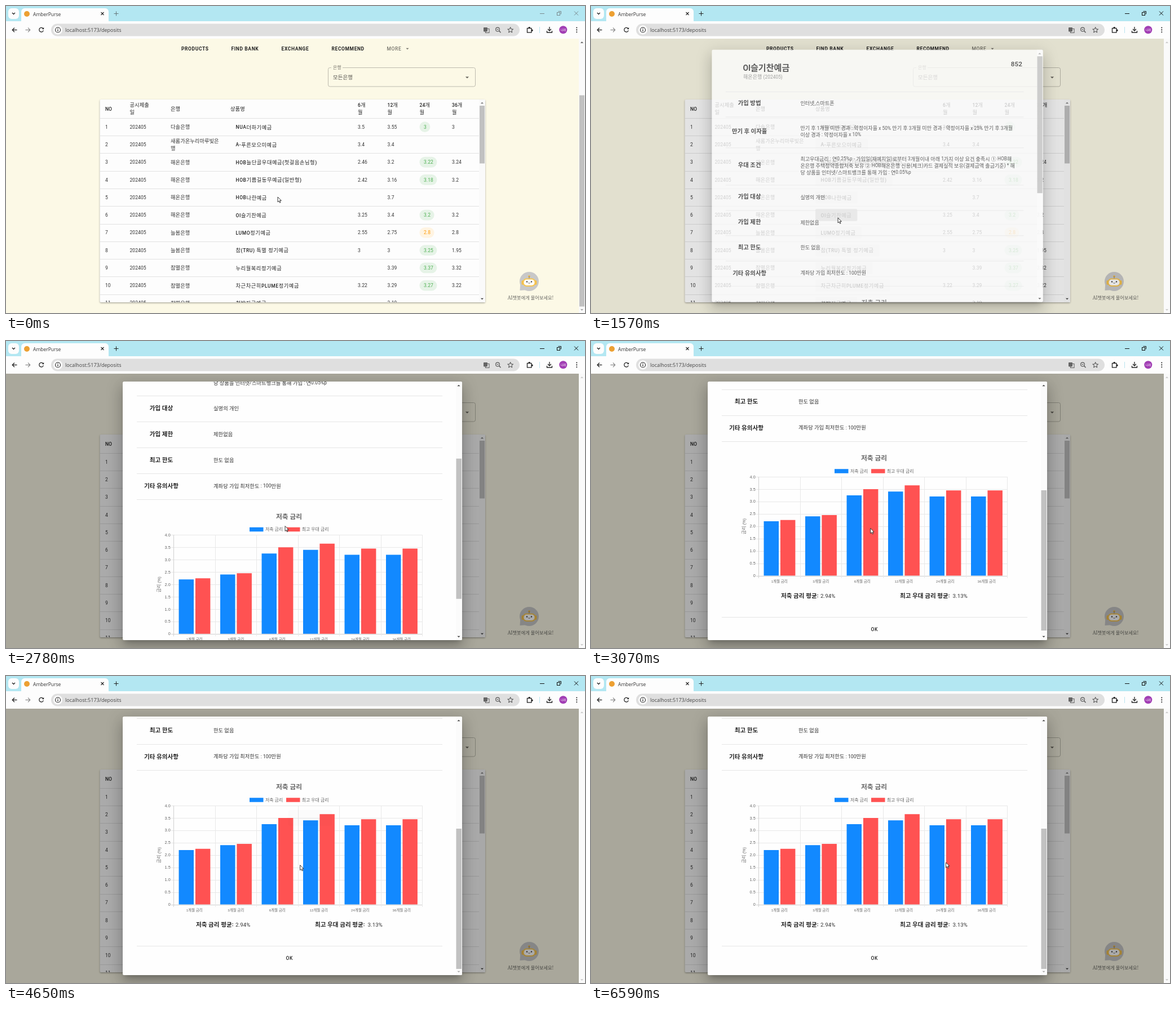
Animation, 1027 px wide and 545 px high, one loop 6700 ms. Source, as an HTML page with a canvas:

```html
<!DOCTYPE html>
<html lang="ko">
<head>
<meta charset="utf-8">
<title>Deposits</title>
<style>
html, body { margin: 0; width: 100%; height: 100%; overflow: hidden; background: #fcf9e6; }
canvas { display: block; width: 1027px; height: 545px; }
</style>
</head>
<body>
<canvas id="stage" width="1027" height="545"></canvas>
<script>
const g = document.getElementById('stage').getContext('2d');
const LOOP = 6700, KR = '"Noto Sans CJK KR", "Noto Sans CJK", sans-serif';
const BLUE = '#1289ff', RED = '#ff5252';

// Bursts of movement: start, end, number of steps
const bursts = [[400, 870, 6], [1370, 1980, 7], [2080, 2180, 2], [2380, 2970, 7], [3070, 3170, 2],
  [3470, 3670, 3], [4360, 4950, 7], [5050, 5720, 8], [5820, 6490, 8], [6590, 6590, 1]];

const cursorKeys = [[310, 482, 339], [870, 438, 376], [1880, 438, 376], [1980, 446, 365], [2080, 473, 345],
  [2180, 495, 328.5], [2970, 495, 328.5], [3070, 495.7, 332.5], [3670, 495.7, 334], [4260, 495.7, 334],
  [4950, 541, 337], [5430, 536.3, 333.5], [5720, 538, 337], [6490, 629.5, 331]];
const scrollKeys = [[2280, 0], [2380, 33], [2970, 328], [3070, 333], [3170, 335], [3370, 335], [3670, 344]];
// Tooltip: time, tip x, tip y, opacity, extra width
const tipKeys = [[3370, 496.5, 252, 0, 0], [3670, 496.5, 252, 1, 0], [4260, 496.5, 252, 1, 0], [4660, 496.5, 252, 0, 0],
  [4850, 581, 252, 0, 16], [5430, 553.5, 255, 0.5, 6], [5720, 540.5, 256.4, 1, 0], [5820, 540.5, 256.4, 1, 0],
  [6010, 566, 247, 1, 0], [6110, 570, 245.5, 0.8, 0], [6300, 606, 261, 0.9, 0], [6400, 614, 265, 0.8, 0],
  [6490, 614, 265, 0.35, 0], [6590, 614, 265, 0, 0]];
const tipItems = [[0, 2, 1], [4700, 3, 0], [5900, 3, 1], [6180, 4, 0]];

const rows = [
  ['다솔은행', 'NUA더하기예금', 3.5, 3.55, 3, 3],
  ['새롬가온누리마루빛은행', 'A-푸른모으미예금', 3.4, 3.4, '', ''],
  ['해온은행', 'HOB늘단골우대예금(첫걸음손님형)', 2.46, 3.2, 3.22, 3.24],
  ['해온은행', 'HOB기쁨길동무예금(일반형)', 2.42, 3.16, 3.18, 3.2],
  ['해온은행', 'HOB나란예금', '', 3.7, '', ''],
  ['해온은행', 'OI슬기찬예금', 3.25, 3.4, 3.2, 3.2],
  ['늘봄은행', 'LUMO정기예금', 2.55, 2.75, 2.8, 2.8],
  ['늘봄은행', '참(TRU) 특별 정기예금', 3, 3, 3.25, 1.95],
  ['참별은행', '누리월복리정기예금', '', 3.39, 3.37, 3.32],
  ['참별은행', '차근차근히PLUME정기예금', 3.22, 3.29, 3.27, 3.22],
  ['참별은행', '첫발자국예금', '', 3.19, '', '']
];
const rateX = [624, 676.5, 741, 791];

// Label, label centre, text lines with the centre of the first, rule below
const details = [
  ['가입 방법', 178, 178.5, ['인터넷,스마트폰'], 203],
  ['만기 후 이자율', 229, 223.5, ['만기 후 1개월 미만 경과 : 약정이자율 x 50% 만기 후 3개월 미만 경과 : 약정이자율 x 25% 만기 후 3개월',
    '이상 경과 : 약정이자율 x 10%'], 259],
  ['우대 조건', 291, 279.7, ['최고우대금리 : 연0.25%p - 가입일(재예치일)로부터 3개월이내 아래 1가지 이상 요건 충족시 ① HOB해',
    '온은행 주택청약종합저축 보유 ② HOB해온은행 신용(체크)카드 결제실적 보유(결제금액 출금기준) * 해',
    '당 상품을 인터넷/스마트뱅크를 통해 가입 : 연0.05%p'], 327.5],
  ['가입 대상', 348.5, 349.5, ['실명의 개인'], 373.5],
  ['가입 제한', 394.5, 395.5, ['제한없음'], 419.5],
  ['최고 한도', 440.5, 441, ['한도 없음'], 465.5],
  ['기타 유의사항', 487, 487, ['계좌당 가입 최저한도 : 100만원'], 511.5]
];
const months = [1, 3, 6, 12, 24, 36];
const series = [['저축 금리', BLUE, '#047df4', [2.2, 2.4, 3.25, 3.4, 3.2, 3.2]],
  ['최고 우대 금리', RED, '#ff3030', [2.25, 2.45, 3.5, 3.65, 3.45, 3.45]]];

function quantize(t) {
  const b = bursts.filter(b => b[0] <= t).pop();
  if (!b) return 0;
  const step = (b[1] - b[0]) / Math.max(1, b[2] - 1) || 1;
  return b[0] + Math.min(b[2] - 1, Math.floor((t - b[0]) / step + 0.1)) * step;
}
function at(keys, t) {
  const n = keys.findIndex(k => k[0] > t);
  if (n === 0) return keys[0].slice(1);
  if (n < 0) return keys[keys.length - 1].slice(1);
  const a = keys[n - 1], b = keys[n], p = (t - a[0]) / (b[0] - a[0]);
  return a.slice(1).map((v, i) => v + (b[i + 1] - v) * p);
}
const ramp = (t, a, b) => Math.max(0, Math.min(1, (t - a) / (b - a)));

// Hangul and Latin runs get their own font; y is the visual centre
function runs(s, size, o) {
  const { w = 400, f = 'Roboto', k = 1.087, ls = size * 0.01 } = o;
  return s.match(/[가-힣①②]+|[^가-힣①②]+/g).map(part => {
    const ko = /[가-힣①②]/.test(part);
    const font = ko ? `${w} ${size * k}px ${KR}` : `${w} ${size}px "${f}", ${KR}`;
    g.font = font;
    g.letterSpacing = ls + 'px';
    return { part, font, ko, ls, width: g.measureText(part).width };
  });
}
const widthOf = (s, size, o = {}) => runs(s, size, o).reduce((n, r) => n + r.width, 0);
function text(s, x, y, size, o = {}) {
  s = String(s);
  if (!s) return;
  const list = runs(s, size, o);
  x -= list.reduce((n, r) => n + r.width, 0) * (o.al || 0);
  g.fillStyle = o.c || '#333';
  for (const r of list) {
    g.font = r.font;
    g.letterSpacing = r.ls + 'px';
    g.fillText(r.part, x, y + size * (r.ko ? 0.4 : 0.355));
    x += r.width;
  }
}
function box(x, y, w, h, c, r = 0) {
  g.fillStyle = c;
  g.beginPath();
  g.roundRect(x, y, w, h, r);
  g.fill();
}
function disc(x, y, r, c) {
  g.fillStyle = c;
  g.beginPath();
  g.arc(x, y, r, 0, 7);
  g.fill();
}
function ring(x, y, r, c, w = 1, a = 0, b = Math.PI * 2) {
  g.strokeStyle = c;
  g.lineWidth = w;
  g.beginPath();
  g.arc(x, y, r, a, b);
  g.stroke();
}
function path(p, c, w = 1, fill = false) {
  g.beginPath();
  for (let i = 0; i < p.length; i += 2) g.lineTo(p[i], p[i + 1]);
  if (fill) { g.closePath(); g.fillStyle = c; g.fill(); }
  else { g.strokeStyle = c; g.lineWidth = w; g.stroke(); }
}
const rule = (x1, x2, y, c) => box(x1, Math.round(y), x2 - x1, 1, c);
const arrow = (x, y, s, c, d = 1) => path([x - s, y - d * s / 2, x + s, y - d * s / 2, x, y + d * s / 2], c, 1, true);

function chrome(active) {
  const ink = '#222', cap = active ? '#111' : '#7a8a8e';
  box(0, 0, 1027, 28, '#b3e7f2');
  box(4, 4, 19, 19, '#fdfdfd', 6);
  path([11, 12, 13.5, 14.5, 16, 12], ink, 1.3);
  box(27, 4, 155, 30, '#fdfdfd', 6);
  disc(37, 14, 5, '#eda032');
  text('AmberPurse', 48, 14.5, 8.5, { f: 'Open Sans', ls: 0 });
  path([168.5, 11, 173.5, 16], ink, 1.1);
  path([173.5, 11, 168.5, 16], ink, 1.1);
  path([191.5, 13.5, 199.5, 13.5], active ? ink : '#66777b');
  path([195.5, 9.5, 195.5, 17.5], active ? ink : '#66777b');
  path([947, 13.5, 955, 13.5], cap);
  g.strokeStyle = cap;
  g.strokeRect(977.5, 11.5, 5, 5);
  path([979.5, 9.5, 984.5, 9.5, 984.5, 14.5], cap);
  path([1008, 9.5, 1015, 16.5], cap);
  path([1015, 9.5, 1008, 16.5], cap);

  box(0, 27, 1027, 31, '#fdfdfd');
  path([19.5, 42.5, 11.5, 42.5], ink, 1.3);
  path([15, 38.7, 11.3, 42.5, 15, 46.3], ink, 1.3);
  path([34.5, 42.5, 42.5, 42.5], '#888', 1.2);
  path([39, 38.7, 42.7, 42.5, 39, 46.3], '#888', 1.2);
  ring(62.7, 42.3, 3.8, ink, 1.3, 0.3, 5.6);
  path([64, 41.2, 67.2, 41.2, 67.2, 38], ink, 1.3, true);
  box(80, 31.5, 831, 22, '#dfdfdf', 11);
  disc(92, 42.5, 8, '#fdfdfd');
  ring(92, 42.5, 4.5, ink, 1.1);
  box(91.4, 41.7, 1.2, 3.3, ink);
  box(91.4, 39.8, 1.2, 1.2, ink);
  text('localhost:5173/deposits', 105, 42.8, 9, { f: 'Open Sans', ls: 0, c: '#444' });
  box(847, 38, 7, 7.5, '#666', 1);
  g.strokeStyle = '#666';
  g.strokeRect(850.5, 40.5, 6.5, 7);
  ring(872, 41.5, 3.4, '#555', 1.1);
  path([874.5, 44, 877.5, 47.2], '#555', 1.4);
  path([870.3, 41.5, 873.7, 41.5], '#555');
  const star = [];
  for (let i = 0; i <= 10; i++) {
    const a = i * Math.PI / 5 - Math.PI / 2, r = i % 2 ? 2.3 : 5.2;
    star.push(894.7 + r * Math.cos(a), 42.8 + r * Math.sin(a));
  }
  path(star, '#444');
  g.strokeStyle = ink;
  g.lineWidth = 1.3;
  g.strokeRect(924.5, 39.5, 7.5, 7.5);
  box(926.5, 37, 3.4, 3, ink, 1.5);
  box(932, 41.5, 2.6, 3.4, ink, 1.5);
  box(946, 37, 1, 11, '#b9e3ee');
  path([964, 37, 964, 43.5], ink, 1.3);
  path([961, 41, 964, 44, 967, 41], ink, 1.3);
  path([959.5, 44, 959.5, 47, 968.5, 47, 968.5, 44], ink, 1.3);
  disc(988.3, 42.3, 7, '#a13db4');
  text('나래', 988.3, 42.3, 4.6, { al: 0.5, c: '#fff', ls: 0 });
  for (const y of [38.5, 42.4, 46.3]) disc(1012.3, y, 1.05, ink);
}

function robot() {
  const grey = '#c8c8c8';
  disc(928, 489, 17, grey);
  path([912.5, 490, 911.5, 505, 926, 504], grey, 1, true);
  disc(928, 480, 1.8, '#f2b632');
  box(927.4, 480, 1.2, 5, '#888');
  box(914.5, 487, 4, 8, '#f4c04a', 2);
  box(937.5, 487, 4, 8, '#f4c04a', 2);
  box(917, 483.5, 22, 14.5, '#f6c552', 6);
  box(918.5, 485.5, 19, 10.5, '#fff', 5);
  disc(924, 489.5, 1.2, '#444');
  disc(932, 489.5, 1.2, '#444');
  ring(928, 490.5, 1.8, '#555', 0.8, 0.3, 2.8);
  text('AI챗봇에게 물어보세요!', 930.5, 518, 8.2, { al: 0.5, f: 'Noto Serif', k: 1, ls: 0, c: '#6b6b66' });
}

function page(t, cx, cy) {
  const opened = t >= 1370;
  box(0, 58, 1016, 487, '#fcf9e6');
  const nav = { w: 600, ls: 0.6, c: '#222' };
  [['PRODUCTS', 311], ['FIND BANK', 399.5], ['EXCHANGE', 488.5], ['RECOMMEND', 577.5]]
    .forEach(([s, x]) => text(s, x, 76, 8.5, nav));
  text('MORE', 675.5, 76, 8.5, { w: 500, ls: 0.6, c: '#77756c' });
  arrow(712, 76, 2.6, '#77756c');

  g.strokeStyle = '#bdbbae';
  g.lineWidth = 1;
  g.beginPath();
  g.roundRect(571.5, 109.5, 261, 33.5, 3);
  g.stroke();
  box(577, 108, 20, 3, '#fcf9e6');
  text('은행', 580, 109, 7.3, { c: '#77756c' });
  text('모든은행', 580, 127, 8.7, { c: '#55534d' });
  arrow(818, 127, 3.1, '#66645c');

  g.save();
  g.shadowColor = 'rgba(0,0,0,.35)';
  g.shadowBlur = 3;
  g.shadowOffsetY = 1.3;
  box(166.5, 166, 683.5, 360, '#fdfdfd', 2);
  g.restore();
  g.save();
  g.beginPath();
  g.rect(166, 166, 684, 360);
  g.clip();
  const head = { w: 500, c: '#222' };
  text('NO', 176, 182.5, 8.5, head);
  [['은행', 292], ['상품명', 398]].forEach(([s, x]) => text(s, x, 182.3, 8.5, head));
  [['공시제출', '일', 219.5], ['6개', '월', 624], ['12개', '월', 676.5], ['24개', '월', 733.5], ['36개', '월', 791]]
    .forEach(([a, b, x]) => { text(a, x, 176, 8.5, head); text(b, x, 188.6, 8.5, head); });
  rule(166, 839, 198.6, '#e2e2e2');
  rows.forEach((r, i) => {
    const y = 214.7 + i * 31.27;
    text(i + 1, 176, y, 8.5);
    text('202405', 219.5, y, 8.5);
    if (r[0].length > 10) {
      text(r[0].slice(0, 10), 292, y - 6.2, 8.5);
      text(r[0].slice(10), 292, y + 6.2, 8.5);
    } else text(r[0], 292, y, 8.5);
    const style = { w: 500, ls: 0.6, c: '#222' }, bw = widthOf(r[1], 8.5, style) + 19.5;
    const hot = cx > 398 && cx < 398 + bw && Math.abs(cy - y) < 10.5 && t > 400 && t < 1900;
    if (hot || opened) box(398, y - 10.7, bw, 21.4, `rgba(0,0,0,${hot ? (opened ? 0.3 : 0.06) : 0.04})`, 2.5);
    text(r[1], 407.5, y + 0.5, 8.5, style);
    r.slice(2).forEach((v, j) => {
      if (v === '') return;
      let c = '#333';
      if (j === 2) {
        const good = v >= 3;
        c = good ? '#4caf50' : '#ff9800';
        box(733.5, y - 9.4, widthOf(String(v), 8.5) + 14, 18.8, good ? '#e6f3e7' : '#fff4e2', 9.4);
      }
      text(v, rateX[j], y, 8.5, { c });
    });
    rule(166, 839, 230.2 + i * 31.27, '#e2e2e2');
  });
  box(839, 166, 11, 360, '#fafafa');
  box(840, 177, 9, 102.5, '#c1c1c1');
  arrow(844.5, 172, 2.6, '#777', -1);
  arrow(844.5, 520, 2.6, '#444');
  g.restore();
  robot();

  box(1016, 58, 11, 487, '#fafafa');
  if (!opened) box(1017, 158.5, 9, 375, '#c1c1c1');
  arrow(1021.5, 64.5, 2.6, opened ? '#c4c4c4' : '#555', -1);
  arrow(1021.5, 539.5, 2.6, opened ? '#c4c4c4' : '#999');
}

function bankIcon(x, y) {
  path([x + 1, y + 8, x + 12, y + 1, x + 23, y + 8], '#2f4468', 1, true);
  box(x + 1, y + 8, 22, 14, '#e0a15c');
  box(x, y + 7, 24, 2.5, '#3b5578');
  box(x, y + 14.5, 24, 1.5, '#3b4a66');
  for (let i = 0; i < 5; i++) {
    box(x + 2.5 + i * 4.2, y + 10.3, 2.4, 3.4, '#34496c');
    if (i !== 2) box(x + 2.5 + i * 4.2, y + 17, 2.4, 3.4, '#34496c');
  }
  box(x + 10, y + 17, 4, 6, '#4a2f28');
  box(x, y + 22, 24, 2, '#3c3f4c');
}
function medal(x, y) {
  ring(x, y, 11.3, '#222', 1.3);
  path([x - 8, y - 4, x - 7, y + 6, x - 4, y + 8.5, x + 4, y + 8.5, x + 7, y + 6, x + 8, y - 4], '#222');
  ring(x - 2.4, y + 4.5, 2.1, '#222');
  ring(x + 2.4, y + 4.5, 2.1, '#222');
}

function chart(oy, t, cx, cy) {
  const base = 749.5 + oy, unit = 43.87, left = 297.5, step = 73.5;
  const grey = { c: '#666', f: 'Liberation Sans', ls: 0 };
  text('저축 금리', 502, 541 + oy, 10.8, { ...grey, al: 0.5, w: 700 });
  box(432, 560.3 + oy, 24.5, 7.5, BLUE);
  text('저축 금리', 460, 564 + oy, 7.3, grey);
  box(497, 560.3 + oy, 24.5, 7.5, RED);
  text('최고 우대 금리', 524.7, 564 + oy, 7.3, grey);
  for (let i = 0; i <= 8; i++) {
    const y = base - i * unit / 2;
    rule(293, 738.5, y, i ? '#e8e8e8' : '#cfcfcf');
    text(i ? (i / 2).toFixed(1) : '0', 291.7, y, 7.3, { ...grey, al: 1 });
  }
  for (let i = 0; i <= 6; i++)
    box(Math.round(left + i * step - 0.5), base - 4 * unit, 1, 4 * unit + 4.5, i ? '#e8e8e8' : '#cfcfcf');
  g.save();
  g.translate(271.5, 662 + oy);
  g.rotate(-Math.PI / 2);
  text('금리 (%)', 0, 0, 7.3, { ...grey, al: 0.5 });
  g.restore();
  months.forEach((m, i) => {
    series.forEach(([, c, hot, vals], j) => {
      const x = 306.5 + i * step + j * 29.4, h = vals[i] * unit;
      const over = t >= 3470 && cx >= x && cx <= x + 26.5 && cy > base - h;
      box(x, base - h, 26.5, h, over ? hot : c);
    });
    text(m + '개월 금리', left + (i + 0.5) * step, 759.7 + oy, 6, { ...grey, al: 0.5 });
  });
  const bold = { w: 700, c: '#222' };
  text('저축 금리 평균:', 337, 785 + oy, 9.7, bold);
  text('2.94%', 407, 785.5 + oy, 9.7);
  text('최고 우대 금리 평균:', 548, 785 + oy, 9.7, bold);
  text('3.13%', 641.5, 785.5 + oy, 9.7);
}

function tooltip(t) {
  const [x, y, a, extra] = at(tipKeys, t);
  if (a <= 0) return;
  const [, i, j] = tipItems.filter(k => k[0] <= t).pop();
  const [name, color, , vals] = series[j];
  const body = `${name}: ${vals[i]}`, o = { c: '#fff', f: 'Liberation Sans', ls: 0 };
  const w = widthOf(body, 7.3, o) + 15.7 + extra, right = i > 2;
  const bx = right ? x - 4.2 - w : x + 4.2, dark = 'rgba(0,0,0,.8)';
  g.save();
  g.globalAlpha = a;
  box(bx, y - 14, w, 28, dark, 3.6);
  const ex = right ? bx + w : bx;
  path([ex, y - 3, ex + (right ? 3 : -3), y, ex, y + 3], dark, 1, true);
  text(months[i] + '개월 금리', bx + 3.6, y - 7, 7.3, { ...o, w: 700 });
  box(bx + 3.6, y + 2.3, 7.3, 7.3, '#fff');
  box(bx + 4.2, y + 2.9, 6.1, 6.1, color);
  text(body, bx + 12.2, y + 5.8, 7.3, o);
  g.restore();
}

// Soft shadow outside the panel only; the casting shapes stay off stage
function panelShadow(scale) {
  const away = 3000;
  g.save();
  g.beginPath();
  g.rect(-200, -200, 1500, 1000);
  g.roundRect(207, 72, 602, 459, 2.5);
  g.clip('evenodd');
  g.shadowOffsetX = away * scale;
  for (const [dy, blur, spread, alpha] of [[6.7, 9, -4, 0.2], [14.5, 23, 2, 0.14], [5.5, 28, 5, 0.12]]) {
    g.shadowColor = `rgba(0,0,0,${alpha})`;
    g.shadowBlur = blur;
    g.shadowOffsetY = dy;
    box(207 - spread - away, 72 - spread, 602 + spread * 2, 459 + spread * 2, '#000', 3);
  }
  g.restore();
}

function dialog(t, cx, cy) {
  const shown = ramp(t, 1440, 1611);
  if (!shown) return;
  const scale = 0.89 + 0.11 * shown;
  const [scroll] = at(scrollKeys, t), loaded = t >= 1660;
  const oy = -scroll - (loaded ? 0 : 9);
  g.save();
  g.globalAlpha = shown;
  g.translate(508, 301.5);
  g.scale(scale, scale);
  g.translate(-508, -301.5);
  panelShadow(scale);
  g.beginPath();
  g.roundRect(207, 72, 602, 459, 2.5);
  g.clip();
  box(207, 72, 602, 459, '#fefefe');

  text('OI슬기찬예금', 263.5, 105 - scroll, 14.2, { w: 700, c: '#333', ls: 0 });
  text('해온은행 (202405)', 264, 121.3 - scroll, 8.5, { c: '#888' });
  if (loaded) {
    bankIcon(227, 97 - scroll);
    medal(761, 104 - scroll);
  }
  text('852', 761, (loaded ? 125 : 97.5) - scroll, 12, { w: 500, al: 0.5, c: '#222' });
  rule(232, 774, 156.6 + oy, '#e6e6e6');
  for (const [label, ly, ty, lines, end] of details) {
    text(label, 275.5, ly + oy, 9.7, { w: 700, al: 0.5, c: '#222' });
    lines.forEach((s, i) => text(s, 368, ty + oy + i * 12.2, 8.5));
    rule(232, 774, end + oy - 0.4, '#e6e6e6');
  }
  chart(oy, t, cx, cy);
  rule(232, 774, 823 + oy, '#e6e6e6');
  text('OK', 502.8, 844.5 + oy, 8.5, { w: 500, ls: 0.6, al: 0.5, c: '#222' });

  box(798, 72, 11, 459, '#fbfbfb');
  box(798.5, 84 + scroll * 0.5436, 9.5, 249, '#c1c1c1');
  arrow(803, 79, 2.6, scroll ? '#444' : '#aaa', -1);
  arrow(803, 525, 2.6, scroll > 343 ? '#aaa' : '#444');
  tooltip(t);
  g.restore();
}

function pointer(x, y) {
  const p = [0, 0, 0, 9, 2.1, 7.2, 3.6, 10.3, 5, 9.6, 3.6, 6.6, 6.3, 6.4, 0, 0].map((v, i) => v + (i % 2 ? y : x));
  path(p, '#fff', 1, true);
  path(p, '#222', 0.9);
}

function draw(now) {
  const t = quantize(now % LOOP);
  const [cx, cy] = at(cursorKeys, t);
  page(t, cx, cy);
  box(0, 58, 1016, 487, `rgba(0,0,0,${0.33 * ramp(t, 1470, 1800)})`);
  dialog(t, cx, cy);
  chrome(t >= 1370);
  pointer(cx, cy);
}

let start;
function tick(now) {
  if (start === undefined) start = now;
  draw(now - start);
  requestAnimationFrame(tick);
}
draw(0);
requestAnimationFrame(tick);
</script>
</body>
</html>
```
